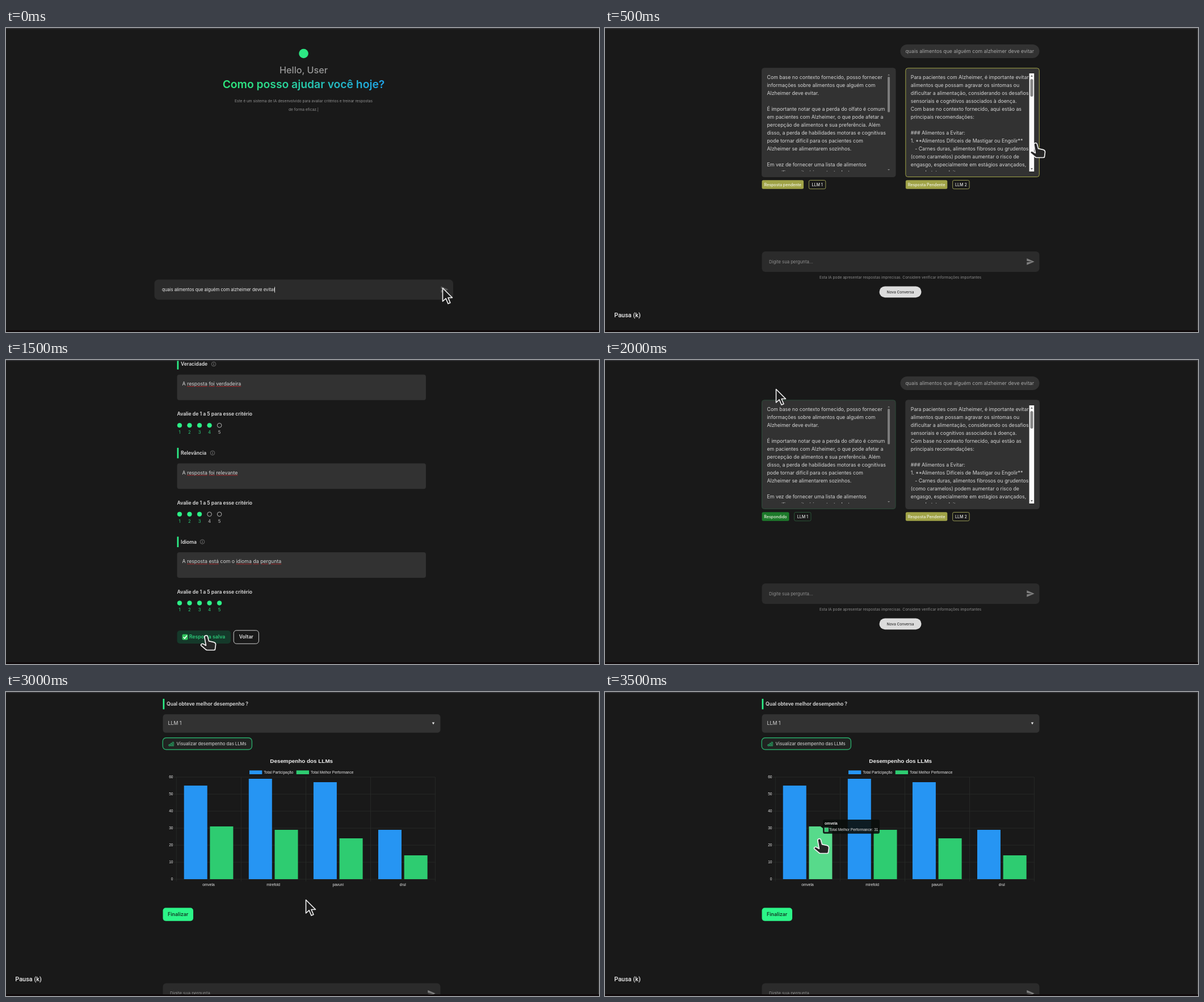
An HTML page that plays this animation: 1045x536 px, repeating every 4 s.

```html
<!DOCTYPE html>
<html lang="pt">
<head>
<meta charset="utf-8">
<title>Chat de avaliação</title>
<style>
  html, body { margin: 0; width: 100%; height: 100%; overflow: hidden; background: #191919; }
  svg { display: block; width: 100%; height: 100%; }
  text { font-family: Inter, sans-serif; font-optical-sizing: none; white-space: pre; }
  .chart text { font-family: "Liberation Sans", Arial, sans-serif; }
  text.tip { font-family: Roboto, sans-serif; }
</style>
</head>
<body>
<svg id="stage" viewBox="0 0 1045 536"></svg>
<script>
const GREEN = '#2cf087', PANEL = '#323232', INPUT = '#2b2b2b', LIGHT = '#d6d6d6';
const LOOP = 4000, STEP = 500;

const range = n => [...Array(n).keys()];
const rect = (x, y, w, h, fill, r = 0, extra = '') =>
  `<rect x="${x}" y="${y}" width="${w}" height="${h}" rx="${r}" fill="${fill}" ${extra}/>`;
const path = (d, fill, extra = '') => `<path d="${d}" fill="${fill}" ${extra}/>`;
const shift = (x, y, body) => `<g transform="translate(${x} ${y})">${body}</g>`;

// Text centred vertically on cy.
const text = (x, cy, str, size, fill, weight = 400, anchor = 'start', extra = '') =>
  `<text x="${x}" y="${cy + size * 0.36}" font-size="${size}" fill="${fill}" ` +
  `font-weight="${weight}" text-anchor="${anchor}" ${extra}>${str}</text>`;

// Words between underscores get the spell checker's red line.
const spell = (str, fill) => str.replace(/_(.+?)_/g,
  `<tspan fill="#b32a2e" text-decoration="underline"><tspan fill="${fill}">$1</tspan></tspan>`);

const arrow = (x, y) => shift(x, y, path(
  'M1 1V24.5L6.6 19.4L10.6 28.6L14.4 26.9L10.5 18H18Z', '#1c1c1c',
  'stroke="#f2f2f2" stroke-width="1.6" stroke-linejoin="round"'));
const hand = (x, y) => shift(x, y, path(
  'M-3.2 1.5C-3.5-1.5 1.5-2.5 2.4.8L4.5 8.6L12.5 10.3Q16.8 11.3 16.5 15L15.5 23Q15.2 24.5 13.5 24.5H1.5' +
  'Q-.2 24.5-1.3 23.1L-9 16.6C-10.6 14.3-7.5 12.6-5.6 13.6L-.6 16.4Z', '#262626',
  'stroke="#f2f2f2" stroke-width="1.7" stroke-linejoin="round"'));
const plane = (x, y, s, fill) =>
  `<g transform="translate(${x} ${y}) scale(${s})">${path('M0 18L21 9L0 0V7L15 9L0 11Z', fill)}</g>`;
const pause = text(16.3, 506.5, 'Pausa (k)', 10.9, '#f0f0f0', 500, 'start', 'class="tip"');

// Home
const home =
  '<circle cx="524.5" cy="45" r="8.3" fill="#2ce783"/>' +
  text(524.5, 74, 'Hello, User', 16.2, '#989898', 500, 'middle') +
  text(524.5, 99.5, 'Como posso ajudar você hoje?', 19.3, 'url(#title)', 600, 'middle') +
  text(524.5, 128.7, 'Este é um sistema de IA desenvolvido para avaliar critérios e treinar respostas', 6.6, '#929292', 400, 'middle') +
  text(524.5, 143.5, 'de forma eficaz.|', 6.6, '#929292', 400, 'middle') +
  rect(261.5, 443.5, 526.5, 35.5, INPUT, 7) +
  text(275, 461.6, 'quais alimentos que alguém com alzheimer deve evitar', 7.7, '#ececec') +
  rect(473, 456.5, 0.9, 10, '#eee') +
  plane(766.5, 455.5, 0.62, '#5c5c5c') + arrow(768.5, 457.5);

// Answers
const leftText = `Com base no contexto fornecido, posso fornecer
informações sobre alimentos que alguém com
Alzheimer deve evitar.

É importante notar que a perda do olfato é comum
em pacientes com Alzheimer, o que pode afetar a
percepção de alimentos e sua preferência. Além
disso, a perda de habilidades motoras e cognitivas
pode tornar difícil para os pacientes com
Alzheimer se alimentarem sozinhos.

Em vez de fornecer uma lista de alimentos
específica, muito é importante destacar`;
const rightText = `Para pacientes com Alzheimer, é importante evitar
alimentos que possam agravar os sintomas ou
dificultar a alimentação, considerando os desafios
sensoriais e cognitivos associados à doença.
Com base no contexto fornecido, aqui estão as
principais recomendações:

### Alimentos a Evitar:
1. **Alimentos Difíceis de Mastigar ou Engolir**
\u00a0\u00a0\u00a0- Carnes duras, alimentos fibrosos ou grudentos
(como caramelos) podem aumentar o risco de
engasgo, especialmente em estágios avançados,
como batata ou leite.`;

const card = (x, body, border) =>
  rect(x, 70.8, 235.5, 191.7, PANEL, 4, `stroke="${border}" stroke-width="1"`) +
  '<g clip-path="url(#cardClip)">' +
  body.split('\n').map((s, i) => text(x + 9, 86.8 + i * 14.02, s, 8.75, LIGHT)).join('') + '</g>';
const tri = (x, y, d, fill, w = 2) => path(`M${x - w} ${y - d}H${x + w}L${x} ${y + d}Z`, fill);

const tag = (x, done, name, label) => {
  const w = done ? 48 : 73.5, nx = x + w + (done ? 9 : 9.3);
  return rect(x, 268.3, w, 15.4, done ? '#1d7a2b' : '#a0a347', 2.5) +
    text(x + w / 2, 276, label, 7.1, '#f0f2e4', 500, 'middle') +
    rect(nx, 268.5, 29.5, 15.2, '#191919', 2.5, `stroke="${done ? '#2c5a3a' : '#a4a75a'}" stroke-width=".9"`) +
    text(nx + 14.8, 276.3, name, 7.1, '#e4e4e4', 500, 'middle');
};

const answers = (done1, done2, border1, border2) =>
  card(276.5, leftText, border1) + card(529.8, rightText, border2) +
  tri(500, 82.5, -1, '#8a8a8a') + rect(498, 86, 4, 62.5, '#7c7c7c', 1.5) + tri(500, 250, 1, '#8a8a8a') +
  rect(747.6, 80, 8.6, 173, '#fbfbfb') + tri(752, 84.5, -1.2, '#555') +
  rect(749.4, 90, 5, 31, '#858585', 2.5) + tri(752, 248.5, 1.2, '#555') +
  tag(276.5, done1, 'LLM 1', done1 ? 'Respondido' : 'Resposta pendente') +
  tag(529.8, done2, 'LLM 2', done2 ? 'Respondido' : 'Resposta Pendente');

const prompt = y => rect(276.5, y, 489, 36, INPUT, 6) +
  text(289, y + 18, 'Digite sua pergunta...', 7.7, '#8f8f8f') +
  plane(743.3, y + 12.2, 0.64, '#808080');

const chat = (done1, border1, border2) =>
  rect(520.5, 29, 245, 24, '#323232', 12) +
  text(529.5, 40.7, 'quais alimentos que alguém com alzheimer deve evitar', 8.75, '#a8a8a8') +
  answers(done1, false, border1, border2) + prompt(394) +
  text(520.7, 439.5, 'Esta IA pode apresentar respostas imprecisas. Considere verificar informações importantes', 6.6, '#8c8c8c', 400, 'middle') +
  rect(483.5, 455.5, 74, 19.7, '#dcdcdc', 9.8) +
  text(520.5, 465.2, 'Nova Conversa', 6.6, '#333', 500, 'middle');

// Criteria form
const heading = (x, cy, str) => rect(x, cy - 9, 2.7, 18.5, GREEN) + text(x + 6.5, cy, str, 8.6, '#dedede', 600);
const info = (x, y) =>
  `<circle cx="${x}" cy="${y}" r="3.8" fill="none" stroke="#8a8a8a" stroke-width=".7"/>` +
  rect(x - 0.4, y - 0.7, 0.8, 2.7, '#999') + rect(x - 0.4, y - 2.1, 0.8, 0.8, '#999');

const criterion = (cy, name, infoX, answer, score) =>
  heading(301.5, cy, name) + info(infoX, cy) +
  rect(301.5, cy + 18.5, 438.5, 45, PANEL, 4) +
  text(310.5, cy + 34.7, spell(answer, LIGHT), 8.75, LIGHT) +
  text(301.5, cy + 88, 'Avalie de 1 a 5 para esse critério', 8.6, '#dedede', 600) +
  range(5).map(i => {
    const on = i < score, x = 305.9 + 17.55 * i;
    return `<circle cx="${x}" cy="${cy + 108}" r="3.8" fill="${on ? GREEN : 'none'}" stroke="${on ? GREEN : '#c4c4c4'}" stroke-width=".9"/>` +
      text(x, cy + 120, i + 1, 7.7, on ? '#2cd07b' : '#c4c4c4', 400, 'middle');
  }).join('');

const check = rect(310.5, 483.5, 10, 10, '#2fc25b', 2) +
  path('M312.6 488.6L314.9 491L318.8 485.8', 'none', 'stroke="#fff" stroke-width="1.5"');
const form = (rows, saved) =>
  rows.map((r, i) => criterion(7.2 + 156.65 * i, ...r)).join('') +
  rect(301.5, 477, 94.5, 23, saved ? '#15392a' : GREEN, 5) +
  (saved ? check + text(322.8, 488.3, 'Resposta salva', 8.7, '#2bc878', 600)
         : text(348.7, 488.3, 'Salvar resposta', 8.7, '#11402a', 600, 'middle')) +
  rect(401.2, 476.8, 44.2, 23.4, '#191919', 5, 'stroke="#cfcfcf" stroke-width="1"') +
  text(423.3, 488.3, 'Voltar', 8.7, '#dedede', 600, 'middle');

const truth = ['Veracidade', 366, 'A _resposta_ _foi_ _verdadeira_', 4];
const partial = form([truth, ['Relevância', 364, '', 0], ['Idioma', 346, '', 0]], false);
const complete = form([truth,
  ['Relevância', 364, 'A _resposta_ _foi_ _relevante_', 3],
  ['Idioma', 346, 'A _resposta_ _está_ com o _idioma_ _da_ _pergunta_', 5]], true);

// Verdict
const verdict = (cy, selectFocus, buttonFocus) =>
  heading(276.5, cy, 'Qual obteve melhor desempenho ?') +
  rect(276.5, cy + 18.3, 489, 32.5, PANEL, 5, selectFocus ? 'stroke="#2bb873" stroke-width="1.1"' : '') +
  text(285.5, cy + 34.3, 'LLM 1', 8.75, LIGHT) + tri(753, cy + 34.4, 2, '#e8e8e8', 2.2) +
  rect(276.2, cy + 59.8, 157.2, 20.7, buttonFocus ? '#202321' : '#1d1d1d', 6,
    `stroke="${buttonFocus ? '#29a868' : '#353535'}" stroke-width="${buttonFocus ? 1.4 : 1}"`) +
  range(3).map(i => rect(286.9 + 3.1 * i, cy + 71.5 - 2.1 * i, 2.3, 2.6 + 2.1 * i, 'none', 0.5,
    'stroke="#2ccb78" stroke-width=".9"')).join('') +
  text(300.5, cy + 70, 'Visualizar desempenho das LLMs', 7.7, '#c6c6c6', 500);
const finish = cy => rect(276.5, cy - 11.6, 53.5, 23.2, '#2cf588', 5) +
  text(303.2, cy, 'Finalizar', 8.9, '#123c28', 600, 'middle');

const review = shift(0, -131.5, answers(true, true, PANEL, PANEL)) +
  heading(276.5, 190, 'Nos Conte o que achou') +
  rect(276.5, 208, 489, 44.5, PANEL, 4) +
  text(285.5, 224.3, spell('O _LLM1_ _tem_ a _resposta_ _mais_ _correta_', LIGHT), 8.75, LIGHT) +
  verdict(284, true, false) + finish(402) + prompt(523) + arrow(527.5, 380.5);

// Chart
const BLUE = '#2695f3', LEAF = '#2ecc71';
const series = [['omvela', 55, 31], ['mirefold', 59, 29], ['pavuni', 57, 24], ['drul', 29, 14]];
const bar = (x, v, fill) => rect(x, 330 - v * 3, 41, v * 3, fill);
const small = (x, y, str, anchor, weight) => text(x, y, str, 6.6, '#e6e6e6', weight, anchor);

const chart = hover => '<g class="chart">' +
  text(520.7, 121.3, 'Desempenho dos LLMs', 9.9, '#f0f0f0', 700, 'middle') +
  rect(429, 138.3, 22.3, 6.7, BLUE) + small(454.3, 141.6, 'Total Participação') +
  rect(511.7, 138.3, 22.3, 6.7, LEAF) + small(537, 141.6, 'Total Melhor Performance') +
  range(7).map(i => rect(296, 329.7 - 30 * i, 460, 0.7, '#2b2e2c') +
    small(294.5, 330 - 30 * i, i * 10, 'end')).join('') +
  range(5).map(i => rect(299.8 + 114.1 * i, 150, 0.7, 184, '#2b2e2c')).join('') +
  series.map(([name, a, b], i) => {
    const c = 357 + 114.1 * i;
    return bar(c - 43.3, a, BLUE) + bar(c + 2.4, b, hover && !i ? '#57da8b' : LEAF) +
      small(c, 339.8, name, 'middle');
  }).join('') +
  (hover ? path('M380 237.3L384.5 234V240.6Z', '#0b0f0d') +
    rect(384, 225, 100, 24.7, '#0b0f0d', 3, 'fill-opacity=".9"') +
    small(387, 231.3, series[0][0], 'start', 700) +
    rect(387, 239.6, 6.6, 6.6, LEAF, 0, 'stroke="#cfe" stroke-width=".4"') +
    small(395, 242.8, 'Total Melhor Performance: 31') : '') + '</g>';

const stats = hover => verdict(21, false, true) + chart(hover) + finish(392.2) + prompt(513.5) +
  (hover ? hand(378, 260) : arrow(527.5, 365.5));

// One scene per half second
const scenes = [
  home,
  chat(false, PANEL, '#a0a347') + hand(759, 204) + pause,
  shift(0, 14, partial) + pause,
  complete + hand(353, 487),
  chat(true, '#2c4a38', PANEL) + arrow(300.5, 50.5),
  review + pause,
  stats(false) + pause,
  stats(true) + pause
];

const stage = document.getElementById('stage');
stage.innerHTML = `<defs>
  <linearGradient id="title" gradientUnits="userSpaceOnUse" x1="379" y1="0" x2="670" y2="0">
    <stop offset="0" stop-color="#2ee97c"/><stop offset=".25" stop-color="#2bdc88"/>
    <stop offset="1" stop-color="#1ea2ea"/>
  </linearGradient>
  <clipPath id="cardClip"><rect x="270" y="79" width="500" height="174"/></clipPath>
  </defs>` + rect(0, 0, 1045, 536, '#191919') +
  scenes.map((s, i) => `<g class="scene">${s}${i ? rect(1043.6, 0, 1.4, 536, '#333') : ''}</g>`).join('') +
  rect(0, 0, 1045, 1.5, '#36363a') + rect(0, 533, 1045, 3, '#100a0b');

const groups = stage.querySelectorAll('.scene');
const start = performance.now();
function draw(now) {
  const current = Math.floor(Math.max(0, now - start) % LOOP / STEP);
  groups.forEach((g, i) => g.setAttribute('display', i === current ? 'inline' : 'none'));
  requestAnimationFrame(draw);
}
draw(start);
</script>
</body>
</html>
```
